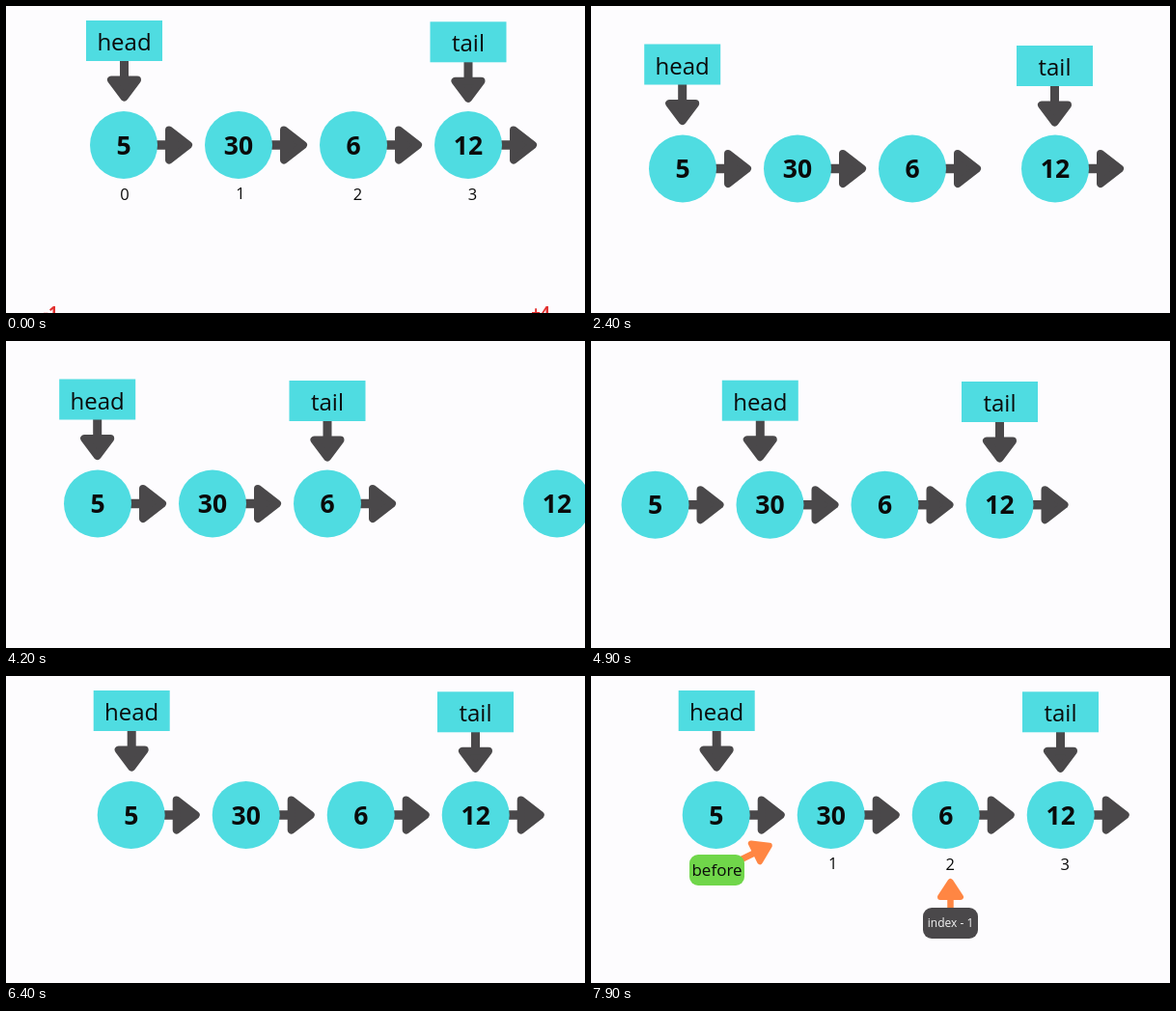
These frames come from a looping animation (600x318 px, 8000 ms). An HTML page with a canvas:

```html
<!DOCTYPE html>
<html lang="en">
<head>
<meta charset="utf-8">
<title>Linked list: remove by index</title>
<style>
html, body { margin: 0; width: 100%; height: 100%; overflow: hidden; background: #fdfcfe; }
canvas { display: block; }
</style>
</head>
<body>
<canvas id="stage" width="600" height="318"></canvas>
<script>
const ctx = document.getElementById('stage').getContext('2d');
const LOOP = 8000, STEP = 119;
const CYAN = '#4fdce1', DARK = '#4a484a', ORANGE = '#ff8643', GREEN = '#70d64a', RED = '#e2302f';
const VALUES = ['5', '30', '6', '12'];

const progress = (t, start, length) => Math.min(1, Math.max(0, (t - start) / length));
const easeInOut = u => 0.5 - 0.5 * Math.cos(Math.PI * u);
const easeOut = u => 1 - (1 - u) ** 3;
const move = (from, to, t, start, length) => from + (to - from) * easeInOut(progress(t, start, length));

function text(str, x, baseline, size, color = '#0a0a0a', weight = 400) {
  ctx.font = `${weight} ${size}px "Open Sans", "Noto Sans", sans-serif`;
  ctx.textAlign = 'center';
  ctx.fillStyle = color;
  ctx.fillText(str, x, baseline);
}

// The tip sits at (x, y); angle 0 points up.
function arrow(x, y, angle, color, { half, head, length, stem, round }) {
  ctx.save();
  ctx.translate(x, y);
  ctx.rotate(angle * Math.PI / 180);
  ctx.fillStyle = ctx.strokeStyle = color;
  ctx.fillRect(-stem / 2, head - 2, stem, length - head + 2);
  ctx.lineWidth = 2 * round;
  ctx.lineJoin = 'round';
  ctx.beginPath();
  ctx.moveTo(0, round);
  ctx.lineTo(half - round, head - round);
  ctx.lineTo(round - half, head - round);
  ctx.closePath();
  ctx.fill();
  ctx.stroke();
  ctx.restore();
}

const LINK = { half: 19.5, head: 28, length: 39, stem: 9.5, round: 4 };
const DOWN = { half: 17.5, head: 26, length: 42, stem: 9, round: 4 };
const POINTER = { half: 13.5, head: 22, length: 32, stem: 6.5, round: 3 };

function node(value, x, y) {
  arrow(x + 71, y, 90, DARK, LINK);
  ctx.fillStyle = CYAN;
  ctx.beginPath();
  ctx.arc(x, y, 35, 0, 2 * Math.PI);
  ctx.fill();
  text(value, x, y + 9.5, 26.5, '#0a0a0a', 700);
}

function flag(label, x, y) {
  arrow(x, y - 45.5, 180, DARK, DOWN);
  ctx.fillStyle = CYAN;
  ctx.fillRect(x - 39.5, y - 129, 79, 42);
  text(label, x, y - 98, 24);
}

function pill(label, x, y, size, fill, color) {
  ctx.fillStyle = fill;
  ctx.beginPath();
  ctx.roundRect(x - 28.5, y, 57, 32, 9);
  ctx.fill();
  text(label, x, y + 16 + size * 0.34, size, color);
}

function indexMark(label, x, y, size) {
  arrow(x, y - 30, 0, ORANGE, POINTER);
  pill(label, x, y, size, DARK, '#f4f4f4');
}

function list(first, y, last = first + 3 * STEP, removed = first) {
  const xs = [removed, first + STEP, first + 2 * STEP, last];
  xs.forEach((x, i) => node(VALUES[i], x, y));
}

function labels(first) {
  [1, 2, 4.5, 4.5].forEach((dx, i) =>
    text(String(i), first + i * STEP + dx, i === 1 ? 199.5 : 201, 16.5));
}

function outOfRange(t) {
  list(122, 144);
  flag('head', 122.5, 144);
  flag('tail', 479, 145.3);
  labels(122);
  ctx.save();
  ctx.translate(0, 124 * (1 - easeOut(progress(t, 0, 850))));
  text('-1', 46, 200, 17, RED, 700);
  text('+4', 554, 200, 17, RED, 700);
  indexMark('index', 46, 239, 18);
  indexMark('index', 554.5, 233.5, 18);
  ctx.restore();
}

function removeTail(t) {
  list(95, 168.5, move(481, 571, t, 2650, 800));
  flag('head', 94.7, 168.5);
  flag('tail', move(480.5, 333, t, 3240, 800), 170);
}

function removeHead(t) {
  list(66.5, 169.7, 423.5, move(66.5, -24, t, 5300, 850));
  flag('head', move(66.5, 185.5, t, 4300, 740), 169.7);
  flag('tail', 423.5, 171);
}

function findBefore(t) {
  list(129.7, 144);
  flag('head', 130.2, 144);
  flag('tail', 486.5, 145.3);

  const rise = easeOut(progress(t, 6650, 650));
  ctx.save();
  ctx.globalAlpha = rise;
  labels(129.7);
  ctx.translate(0, 26 * (1 - rise));
  indexMark('index - 1', 372.5, 240, 12);
  ctx.restore();

  const slide = easeOut(progress(t, 7200, 600));
  ctx.save();
  ctx.globalAlpha = slide;
  ctx.translate(-80 * (1 - slide), 0);
  arrow(187.5, 174.5, 64, ORANGE, { ...POINTER, length: 37 });
  pill('before', 130.5, 185, 17, GREEN, '#0a0a0a');
  ctx.restore();
}

const SCENES = [[2100, outOfRange], [4250, removeTail], [6350, removeHead], [LOOP, findBefore]];
let start;

function frame(now) {
  start ??= now;
  const t = (now - start) % LOOP;
  ctx.fillStyle = '#fdfcfe';
  ctx.fillRect(0, 0, 600, 318);
  SCENES.find(([end]) => t < end)[1](t);
  requestAnimationFrame(frame);
}
requestAnimationFrame(frame);
</script>
</body>
</html>
```
